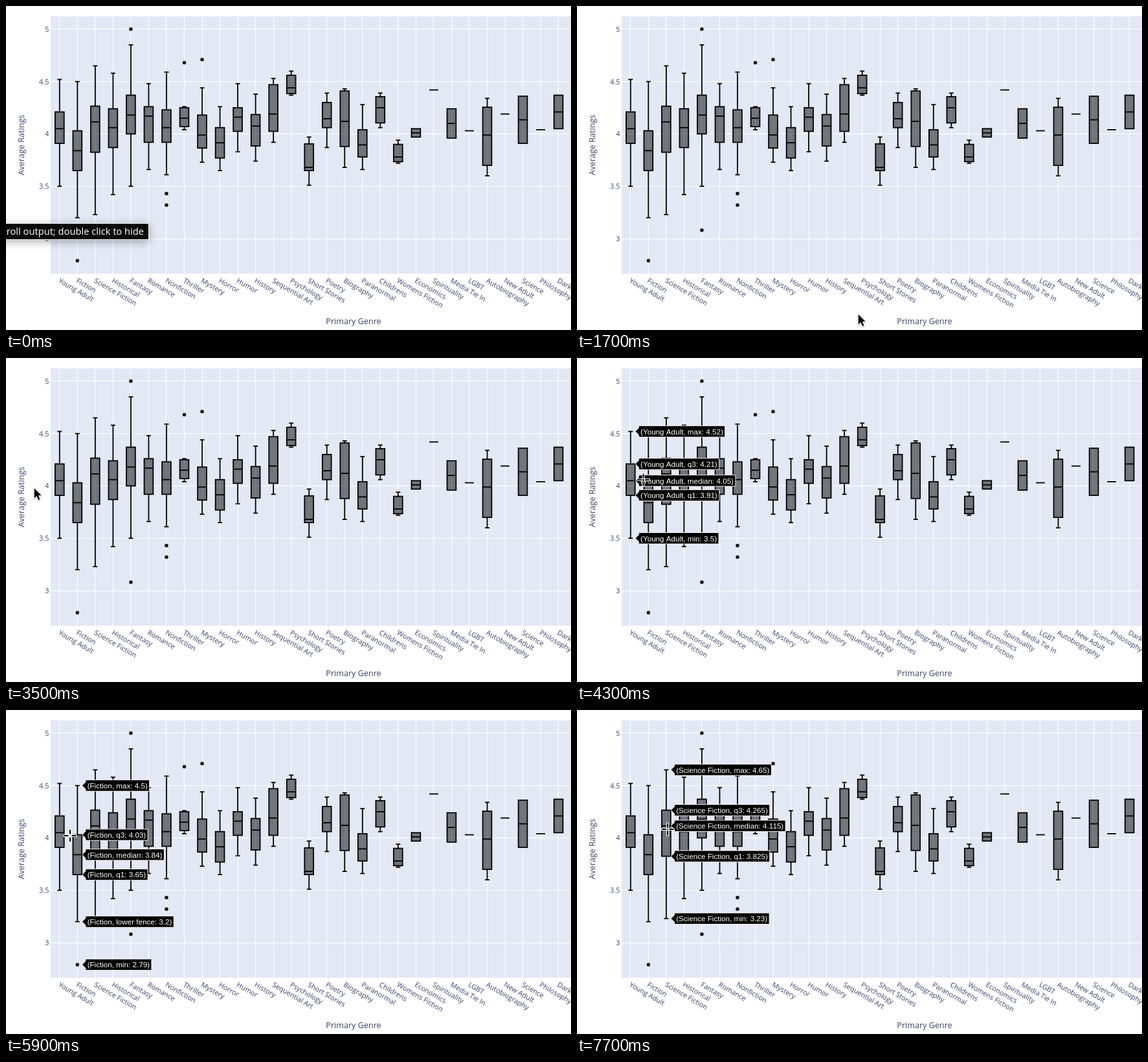
Recreate the animation shown at these times as an HTML page with a canvas. Size 873 px wide and 500 px high, loop 8000 ms.

```html
<!DOCTYPE html>
<html lang="en">
<head>
<meta charset="utf-8">
<title>Average ratings by genre</title>
<style>
html, body { margin: 0; width: 100%; height: 100%; overflow: hidden; background: #fff; }
canvas { display: block; }
</style>
</head>
<body>
<canvas id="stage" width="873" height="500"></canvas>
<script>
const ctx = document.getElementById('stage').getContext('2d');
const LOOP = 8000, STEP = 100;
const PLOT = { left: 69, top: 16, right: 873, bottom: 413 };
const INK = '#38426b';
const SANS = '"Open Sans", "Noto Sans", sans-serif';
const ARIAL = '"Liberation Sans", Arial, sans-serif';
const HALF = 6.9;

// name, [min, q1, median, q3, max] or [q1, median, q3] or [value], outliers
const genres = [
  ['Young Adult', [3.5, 3.91, 4.05, 4.21, 4.52]],
  ['Fiction', [3.2, 3.65, 3.84, 4.03, 4.5], [2.79]],
  ['Science Fiction', [3.23, 3.825, 4.115, 4.265, 4.65]],
  ['Historical', [3.42, 3.87, 4.06, 4.24, 4.58]],
  ['Fantasy', [3.5, 4, 4.18, 4.37, 4.85], [5, 3.08]],
  ['Romance', [3.66, 3.92, 4.17, 4.26, 4.48]],
  ['Nonfiction', [3.61, 3.92, 4.06, 4.23, 4.59], [3.43, 3.32]],
  ['Thriller', [4.04, 4.07, 4.15, 4.25, 4.26], [4.68]],
  ['Mystery', [3.73, 3.865, 3.99, 4.18, 4.44], [4.71]],
  ['Horror', [3.65, 3.77, 3.915, 4.06, 4.26]],
  ['Humor', [3.83, 4.025, 4.16, 4.25, 4.48]],
  ['History', [3.74, 3.885, 4.075, 4.185, 4.38]],
  ['Sequential Art', [3.92, 4.025, 4.19, 4.47, 4.53]],
  ['Psychology', [4.37, 4.385, 4.44, 4.56, 4.6]],
  ['Short Stories', [3.51, 3.65, 3.68, 3.905, 3.97]],
  ['Poetry', [3.87, 4.06, 4.145, 4.3, 4.39]],
  ['Biography', [3.68, 3.88, 4.12, 4.41, 4.43]],
  ['Paranormal', [3.66, 3.78, 3.895, 4.04, 4.28]],
  ['Childrens', [4.06, 4.105, 4.25, 4.355, 4.39]],
  ['Womens Fiction', [3.72, 3.735, 3.78, 3.9, 3.94]],
  ['Economics', [3.97, 4.01, 4.05]],
  ['Spirituality', [4.42]],
  ['Media Tie In', [3.96, 4.1, 4.24]],
  ['LGBT', [4.03]],
  ['Autobiography', [3.6, 3.7, 3.99, 4.255, 4.34]],
  ['New Adult', [4.19]],
  ['Science', [3.91, 4.135, 4.36]],
  ['Philosophy', [4.04]],
  ['Dark', [4.05, 4.21, 4.37]]
];

// pointer path: time, x, y
const path = [
  [700, 3, 405], [1000, 85, 452], [1300, 222, 474], [1500, 290, 471], [1600, 290, 471],
  [1700, 434, 475], [1800, 470, 476], [1900, 494, 476], [2100, 512, 476], [2200, 512, 476],
  [2300, 485, 476], [2500, 270, 462], [2700, 62, 425], [2900, 7, 325], [3100, 46, 266],
  [3200, 46, 254], [3400, 44, 211], [3500, 43, 200], [3600, 43, 200],
  [3800, 52, 198], [4000, 73, 193], [4200, 96, 189], [4300, 102.5, 188],
  [4400, 105, 188], [4500, 105, 188], [4600, 102, 187], [4700, 94, 190], [4800, 94, 190],
  [4900, 92, 189]
];
// slow moves that jump from rest to rest
const rests = [
  [5900, 99, 194], [6200, 105, 199], [6600, 105.5, 201.5], [6900, 108.5, 202],
  [7400, 117, 199], [7600, 129, 192], [7700, 140, 184]
];
// hovered genre from a given time on
const hovers = [[4100, 0], [4400, 1], [4900, 0], [5900, 1], [7600, 2]];

const catX = i => 82.8 + 27.53 * i;
const valY = v => 35.8 + (5 - v) * 161.6;
const latest = (list, t) => list.filter(k => k[0] <= t).pop();

function line(x1, y1, x2, y2) {
  ctx.beginPath();
  ctx.moveTo(x1, y1);
  ctx.lineTo(x2, y2);
  ctx.stroke();
}

function text(str, x, y, size, align = 'left', angle = 0, color = INK, family = SANS) {
  ctx.save();
  ctx.translate(x, y);
  ctx.rotate(angle * Math.PI / 180);
  ctx.font = size + 'px ' + family;
  ctx.fillStyle = color;
  ctx.textAlign = align;
  ctx.fillText(str, 0, 0);
  ctx.restore();
}

function drawAxes() {
  ctx.fillStyle = '#fff';
  ctx.fillRect(0, 0, 873, 500);
  ctx.fillStyle = '#e4e8f5';
  ctx.fillRect(PLOT.left, PLOT.top, PLOT.right - PLOT.left, PLOT.bottom - PLOT.top);
  ctx.strokeStyle = '#fff';
  ctx.lineWidth = 1;
  genres.forEach(([name], i) => {
    const x = Math.floor(catX(i)) + 0.5;
    line(x, PLOT.top, x, PLOT.bottom);
    text(name, catX(i) - 2.6, 426, 10.8, 'left', 30);
  });
  for (let v = 3; v <= 5; v += 0.5) {
    const y = Math.floor(valY(v)) + 0.5;
    line(PLOT.left, y, PLOT.right, y);
    text(String(v), 66.3, valY(v) + 4, 10.8, 'right');
  }
  text('Primary Genre', 537, 491, 12.6, 'center');
  text('Average Ratings', 27.5, 214.5, 12.6, 'center', -90);
}

function drawBox([, vals, dots = []], i) {
  const x = catX(i), ys = vals.map(valY);
  const [q1, med, q3] = ys.length === 5 ? ys.slice(1, 4) : ys;
  ctx.strokeStyle = ctx.fillStyle = '#000';
  ctx.lineWidth = 1.8;
  if (ys.length > 1) {
    ctx.fillStyle = 'rgba(0,0,0,.5)';
    ctx.fillRect(x - HALF, q3, HALF * 2, q1 - q3);
    ctx.strokeRect(x - HALF, q3, HALF * 2, q1 - q3);
    line(x - HALF, med, x + HALF, med);
  } else {
    line(x - HALF, q1, x + HALF, q1);
  }
  if (ys.length === 5) {
    for (const [a, b] of [[q1, ys[0]], [q3, ys[4]]]) {
      line(x, a, x, b);
      line(x - HALF / 2, b, x + HALF / 2, b);
    }
  }
  ctx.fillStyle = '#000';
  for (const v of dots) {
    ctx.beginPath();
    ctx.arc(x, valY(v), 2.7, 0, Math.PI * 2);
    ctx.fill();
  }
}

function drawLabel(str, x, y) {
  const size = 11.65, left = x + 5.4, h = 8.7;
  ctx.font = size + 'px ' + ARIAL;
  const right = left + ctx.measureText(str).width + 5.6;
  ctx.beginPath();
  [[x, y], [left, y - 5.4], [left, y - h], [right, y - h],
   [right, y + h], [left, y + h], [left, y + 5.4]].forEach(p => ctx.lineTo(...p));
  ctx.closePath();
  ctx.fillStyle = '#000';
  ctx.fill();
  ctx.strokeStyle = '#fff';
  ctx.lineWidth = 0.9;
  ctx.stroke();
  text(str, left + 2.7, y + 4.5, size, 'left', 0, '#fff', ARIAL);
}

function drawHover(i) {
  const [name, vals, dots = []] = genres[i];
  const low = dots.filter(v => v < vals[0]);
  const keys = [low.length ? 'lower fence' : 'min', 'q1', 'median', 'q3', 'max'];
  const rows = keys.map((k, n) => [k, vals[n]]);
  if (low.length) rows.push(['min', Math.min(...low)]);
  for (const [k, v] of rows) drawLabel(`(${name}, ${k}: ${v})`, catX(i) + 7.2, valY(v));
}

function drawTip() {
  ctx.save();
  ctx.shadowColor = 'rgba(0,0,0,.32)';
  ctx.shadowBlur = 13;
  ctx.shadowOffsetY = 3;
  ctx.fillStyle = '#fff';
  ctx.fillRect(-40, 335, 261, 26);
  ctx.restore();
  ctx.fillStyle = '#0a0a0a';
  ctx.fillRect(-40, 336, 260, 24);
  text('scroll output; double click to hide', 213, 353, 14.7, 'right', 0, '#fff');
}

function drawArrow(x, y) {
  ctx.save();
  ctx.translate(x + 0.7, y + 1);
  ctx.beginPath();
  [[0, 0], [0, 15.2], [3.6, 12], [6.4, 18], [8.8, 17], [6.2, 11.2], [10.8, 10.8]]
    .forEach(p => ctx.lineTo(...p));
  ctx.closePath();
  ctx.lineJoin = 'round';
  ctx.shadowColor = 'rgba(0,0,0,.3)';
  ctx.shadowBlur = 2;
  ctx.shadowOffsetY = 1;
  ctx.strokeStyle = '#fff';
  ctx.lineWidth = 2;
  ctx.stroke();
  ctx.shadowColor = 'transparent';
  ctx.fillStyle = '#000';
  ctx.fill();
  ctx.restore();
}

function drawCross(x, y) {
  for (const [color, width, from, to] of [['#fff', 4, 1.5, 10.3], ['#000', 2, 2.5, 9.3]]) {
    ctx.strokeStyle = color;
    ctx.lineWidth = width;
    for (const [dx, dy] of [[1, 0], [-1, 0], [0, 1], [0, -1]]) {
      line(x + dx * from, y + dy * from, x + dx * to, y + dy * to);
    }
  }
}

function pointerAt(t) {
  const rest = latest(rests, t);
  if (rest) return rest.slice(1);
  const a = latest(path, t), b = path.find(k => k[0] > t) || a;
  const f = a === b ? 0 : (t - a[0]) / (b[0] - a[0]);
  return [a[1] + (b[1] - a[1]) * f, a[2] + (b[2] - a[2]) * f];
}

function draw(t) {
  drawAxes();
  genres.forEach(drawBox);
  if (t < 700) return drawTip();
  const hover = latest(hovers, t);
  if (hover) drawHover(hover[1]);
  const [x, y] = pointerAt(t);
  const inside = x > PLOT.left && y > PLOT.top && y < PLOT.bottom;
  (inside ? drawCross : drawArrow)(x, y);
}

const start = performance.now();
function tick() {
  const t = (performance.now() - start) % LOOP;
  draw(Math.floor(t / STEP) * STEP);
  requestAnimationFrame(tick);
}
tick();
</script>
</body>
</html>
```
